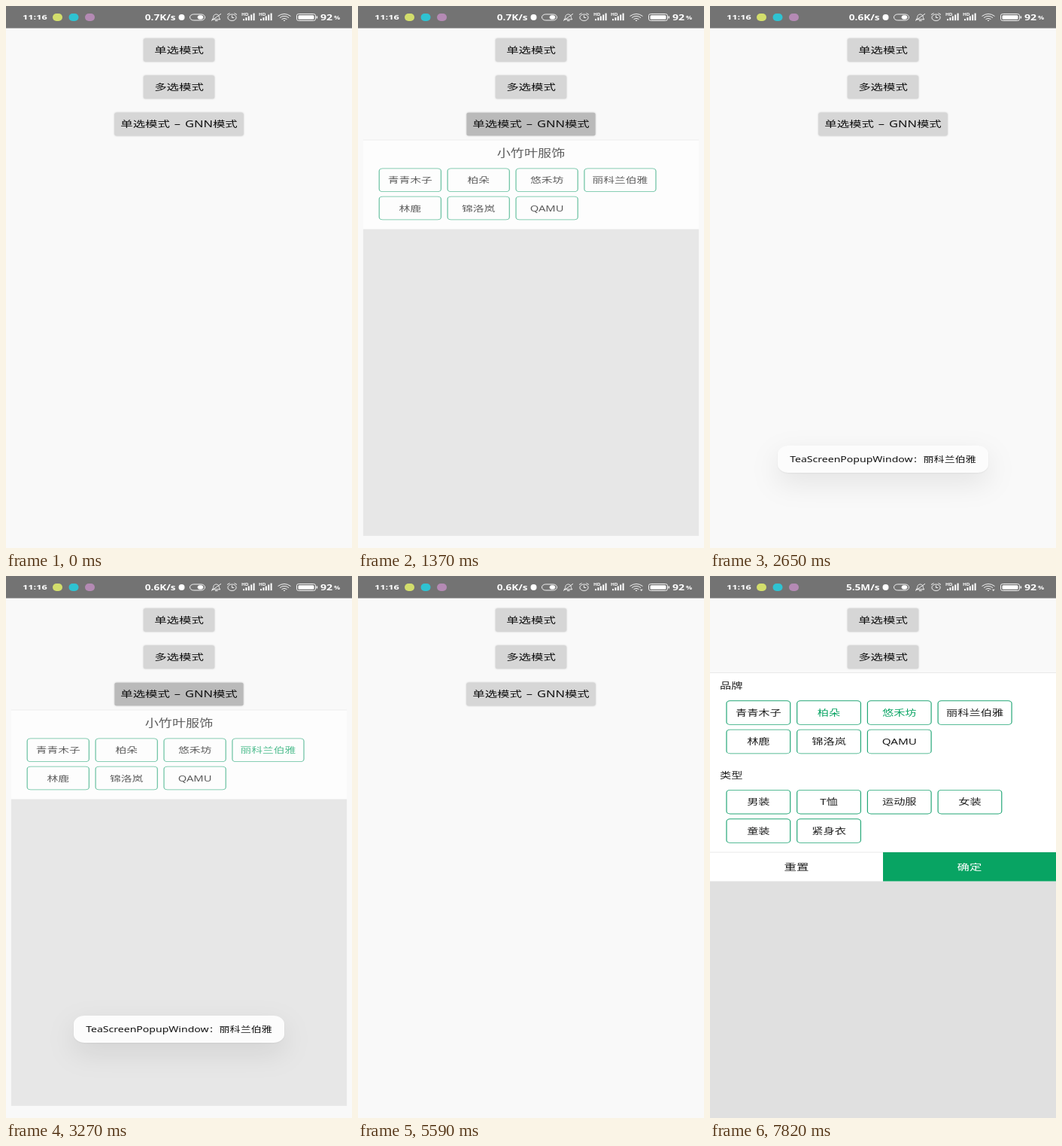
An HTML page for the animation above (8000 ms loop, 460x720 px).

```html
<!DOCTYPE html>
<html lang="zh-CN">
<head>
<meta charset="utf-8">
<style>
html, body { margin: 0; width: 460px; height: 720px; overflow: hidden; background: #f9f9f9; }
svg { display: block; }
text { font-family: "Noto Sans", "Noto Sans CJK SC", "Noto Sans CJK", sans-serif; }
.btn { filter: drop-shadow(0 .6px .9px rgba(0,0,0,.26)); }
.toast { filter: drop-shadow(0 1px 1px rgba(0,0,0,.06)) drop-shadow(0 13px 18px rgba(0,0,0,.09)); }
.line { fill: none; stroke: #f4f4f4; stroke-width: 1; }
</style>
</head>
<body>
<svg id="stage" width="460" height="720" viewBox="0 0 460 720"></svg>
<script>
const GREEN = '#08a463';
const WIDE = 1.384; // the phone screen is shown wider than it is
const LOOP = 8000;

// Text centred vertically on y
const text = (x, y, size, str, attrs = '') =>
  `<text transform="translate(${x} ${y + size * .37}) scale(${WIDE} 1)" font-size="${size}" ${attrs}>${str}</text>`;
const MID = 'text-anchor="middle"';
const rect = (x, y, w, h, fill, attrs = '') =>
  `<rect x="${x}" y="${y}" width="${w}" height="${h}" fill="${fill}" ${attrs}/>`;

function button(x, y, w, label, id) {
  const r = 'rx="2.3" ry="1.7"';
  return rect(x, y, w, 30.5, '#d6d6d6', r + ' class="btn"') +
    rect(x, y, w, 30.5, '#000', `${r} id="${id}" opacity="0"`) +
    text(230, y + 15.3, 11.85, label, MID + ' font-weight="500" fill="#111" word-spacing="1.3"');
}

function chips(y, step, names, ids = {}) {
  return names.map((name, i) => {
    const x = 22 + (i % 4) * 93.7, top = y + (i >> 2) * step;
    const w = name.length > 4 ? 98 : 84.7;
    return rect(x / WIDE, top, w / WIDE, 31.7, '#fff',
        `rx="3.4" stroke="#22a676" stroke-width=".85" transform="scale(${WIDE} 1)"`) +
      text(x + w / 2, top + 16, 11, name, `${MID} fill="#1c1c1c" id="${ids[i] || ''}"`);
  }).join('');
}

function signal(x) {
  let s = text(x, 11.5, 4.6, 'HD', 'fill="#fff" font-weight="700"');
  for (let i = 0; i < 5; i++) s += rect(x + 2 + i * 3.4, 17.2 - i * 1.9, 2, 2 + i * 1.9, '#fff');
  return s;
}

function statusBar() {
  const white = 'fill="#fff" font-weight="600" ';
  return rect(0, 0, 460, 29.5, '#737373') +
    text(22, 15, 9.2, '11:16', white) +
    rect(62, 10, 13, 10, '#d3de6c', 'rx="5"') +
    rect(83.5, 10, 13, 10, '#2fc3d2', 'rx="5"') +
    rect(105, 10, 13, 10, '#b48ab4', 'rx="5"') +
    text(225.5, 15, 9.8, '', white + 'text-anchor="end" id="speed"') +
    '<circle cx="233.5" cy="15" r="4" fill="#fff"/>' +
    `<g class="line">
      <rect x="244.5" y="11" width="20" height="8" rx="5" ry="4"/>
      <ellipse cx="258.5" cy="15" rx="3.6" ry="2.4" fill="#fff"/>
      <path d="M274 17.8h11c-2-1.4-1.4-2.8-2-4.5c-.8-3-6.2-3-7 0c-.6 1.700 0 3.100-2 4.500M278 19.600h3.500M273 19.500L286 10.300"/>
      <ellipse cx="300.500" cy="15.300" rx="5.600" ry="4.300"/>
      <path d="M300.500 12.500v3h2.700M294 11.500l3.500-2M307 11.500l-3.500-2"/>
      <path d="M361.500 13.500Q370 7.500 378.500 13.500M364 15.600Q370 11.200 376 15.600M366.500 17.600Q370 15 373.500 17.600"/>
      <path d="M368.500 18.800L370 20.200L371.500 18.800z" fill="#fff" stroke="none"/>
      <rect x="386.500" y="10.500" width="25" height="9" rx="3" ry="2.200"/>
    </g>`.replace(/(\.\d)00/g, '$1') +
    signal(313) + signal(336) +
    '<path id="arrow" d="M374.5 17.5h4.5l-2.2 3z" fill="#fff" stroke="#737373" stroke-width=".6"/>' +
    rect(388.5, 12.2, 21, 5.6, '#fff', 'rx="1.5"') + rect(412.6, 13.5, 1.5, 3, '#fff') +
    text(418, 15, 10.2, '92', white) + text(436, 16, 6.6, '%', white);
}

const brands = ['青青木子', '柏朵', '悠禾坊', '丽科兰伯雅', '林鹿', '锦洛岚', 'QAMU'];
const types = ['男装', 'T恤', '运动服', '女装', '童装', '紧身衣'];

const single = rect(0, 178, 460, 122, '#fff') + rect(0, 177.5, 460, 1, '#e9e9e9') +
  rect(0, 300, 460, 420, '#000', 'opacity=".1"') +
  text(230, 196, 13.5, '小竹叶服饰', MID + ' fill="#1c1c1c"') +
  chips(217, 38.4, brands, { 3: 'pick' });

const multi = rect(0, 128, 460, 277.5, '#fff') + rect(0, 128, 460, 1, '#e9e9e9') +
  rect(0, 405.5, 460, 314.5, '#000', 'opacity=".1"') +
  text(13, 146, 11, '品牌', 'fill="#1c1c1c"') +
  chips(165.7, 38.4, brands, { 1: 'second', 2: 'first' }) +
  text(13, 265, 11, '类型', 'fill="#1c1c1c"') +
  chips(284.3, 38.4, types) +
  rect(0, 366.5, 460, 1, '#e9e9e9') + rect(230, 367, 230, 38.5, GREEN) +
  text(115, 387, 11.85, '重置', MID + ' fill="#1c1c1c"') +
  text(345, 387, 11.85, '确定', MID + ' fill="#fff"');

const toast = rect(90, 584, 280, 36, '#fcfcfc', 'rx="15" ry="11" class="toast"') +
  text(230, 602, 10.15, 'TeaScreenPopupWindow：' + brands[3], MID + ' fill="#111"');

document.getElementById('stage').innerHTML =
  rect(0, 0, 460, 720, '#f9f9f9') +
  button(183, 43.2, 94, '单选模式', 'press1') +
  button(183, 92.5, 94, '多选模式', 'press2') +
  button(144.5, 141.8, 171, '单选模式 – GNN模式', 'press3') +
  `<g id="single">${single}</g><g id="multi">${multi}</g><g id="toast">${toast}</g>` +
  statusBar();

const el = id => document.getElementById(id);
const set = (id, name, value) => el(id).setAttribute(name, value);
const ramp = (t, start, length) => Math.min(1, Math.max(0, (t - start) / length));
const ease = (t, start) => 1 - (1 - ramp(t, start, 200)) ** 2;
const shown = (t, open, close) => ease(t, open) * (1 - ease(t, close));
const press = (t, open) => .13 * ramp(t, open - 100, 80) * (1 - ramp(t, open + 130, 250));

// Popups fade while growing from 90% about their top centre
function popup(id, top, p) {
  set(id, 'opacity', p);
  set(id, 'visibility', p > 0 ? 'visible' : 'hidden');
  set(id, 'transform', `translate(230 ${top}) scale(${.9 + .1 * p}) translate(-230 ${-top})`);
}
const choose = (id, on) => set(id, 'fill', on ? GREEN : '#1c1c1c');

function draw() {
  const t = performance.now() % LOOP;
  popup('single', 178, shown(t, 1280, 2111) + shown(t, 3180, 5000));
  popup('multi', 128, ease(t, 6292));
  set('press3', 'opacity', press(t, 1280) + press(t, 3180));
  set('press2', 'opacity', press(t, 6292));
  set('toast', 'opacity', ramp(t, 2180, 220) * (1 - ramp(t, 4130, 250)));
  choose('pick', t >= 2700);
  choose('first', t >= 6870);
  choose('second', t >= 7260);
  el('speed').textContent = t < 1940 ? '0.7K/s' : t < 5940 ? '0.6K/s' : '5.5M/s';
  set('arrow', 'opacity', t < 4000 ? 0 : 1);
  requestAnimationFrame(draw);
}
draw();
</script>
</body>
</html>
```
